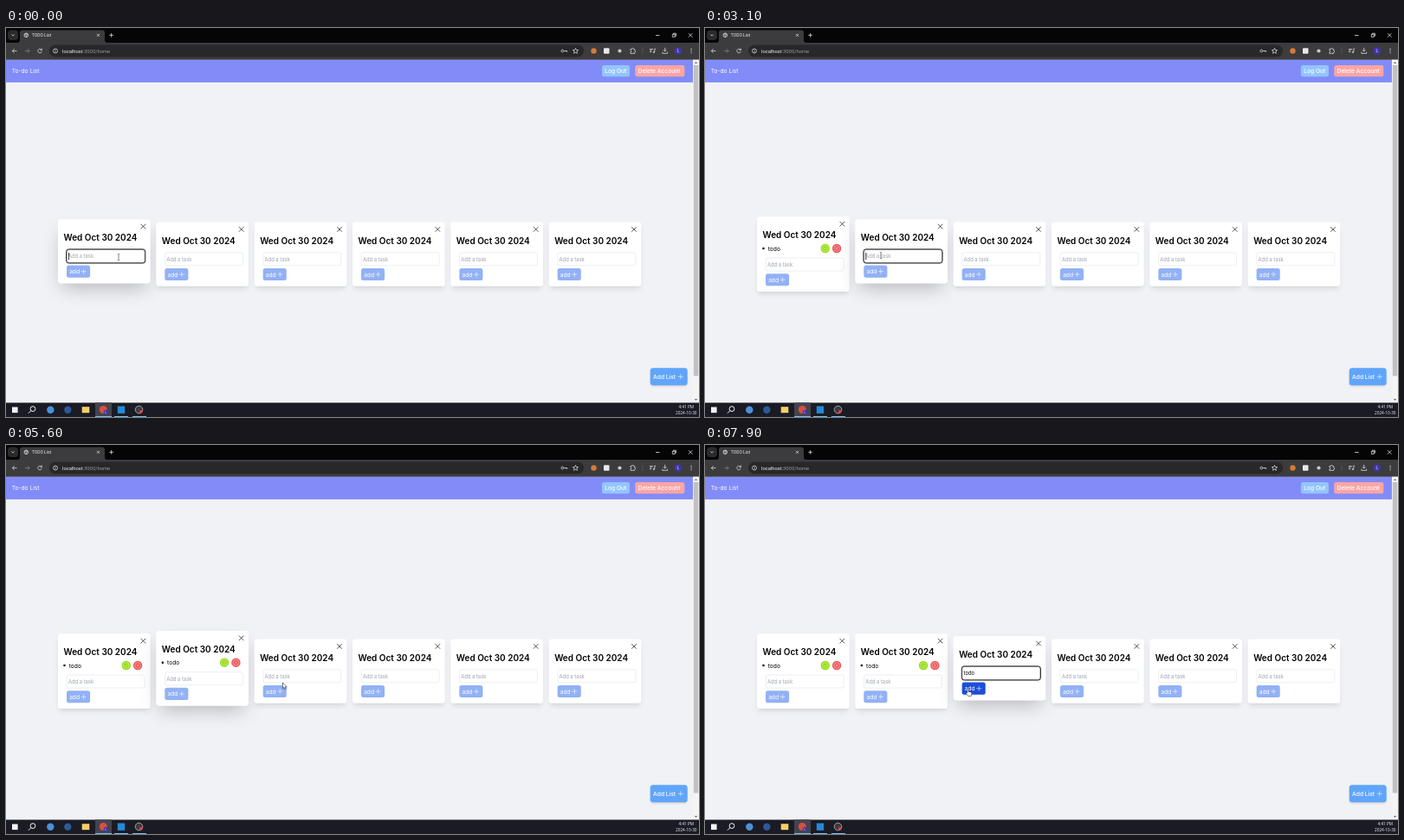
Animation, 800 px wide and 450 px high, one loop 8 s. Source, as an HTML page:

```html
<!DOCTYPE html>
<html lang="en">
<head>
<meta charset="utf-8">
<title>TODO List</title>
<style>
html, body { margin: 0; width: 100%; height: 100%; overflow: hidden; background: #f0f2f6; }
/* The desktop is laid out at 1920 x 1080 and shown on an 800 x 450 stage. */
#desktop {
  position: absolute; left: 0; top: 0; width: 1920px; height: 1080px; overflow: hidden;
  transform: scale(.4166667); transform-origin: 0 0;
  font: 16px/24px Inter, sans-serif; color: #000; background: #f0f2f6;
}
#desktop * { box-sizing: border-box; }
#desktop div, #desktop > svg { position: absolute; white-space: pre; }
#frame, #pointer { left: 0; top: 0; width: 1920px; height: 1080px; }
.icon { fill: none; stroke: currentColor; stroke-width: 1.6; stroke-linecap: round; stroke-linejoin: round; }

#nav { left: 0; top: 88px; width: 1903px; height: 63px; background: #818cf8; color: #fff; }
#nav div { top: 15px; height: 32px; line-height: 32px; padding: 0 8px; border-radius: 6px; font-weight: 500; }
#nav .brand { left: 8px; font-weight: 400; }
#nav .logout { left: 1651px; width: 77px; background: #93c5fd; }
#nav .delete { left: 1743px; width: 137px; background: #fca5a5; }
#new {
  left: 1785px; top: 944px; width: 103px; height: 48px; padding-left: 8px; line-height: 48px;
  border-radius: 8px; background: #60a5fa; color: #fff; font-weight: 500;
  box-shadow: 0 4px 6px -1px #0002, 0 2px 4px -2px #0002;
}
#new svg { position: absolute; right: 9px; top: 14px; }

.card {
  --lift: 0; top: 539px; width: 256px; height: 178px; border-radius: 8px; background: #fff;
  transform: translateY(calc(-8px * var(--lift)));
  box-shadow:
    0 calc(10px + 15px * var(--lift)) calc(15px + 35px * var(--lift)) calc(-3px - 9px * var(--lift))
      rgba(0, 0, 0, calc(.1 + .15 * var(--lift))),
    0 4px 6px -4px rgba(0, 0, 0, calc(.1 - .1 * var(--lift)));
}
.card .close { position: absolute; left: 224px; top: 8px; }
.title { left: 16px; top: 36px; font: 600 24px/32px Inter, sans-serif; }
.item { display: none; left: 0; top: 76px; width: 256px; height: 24px; }
.item span { position: absolute; left: 31px; }
.item svg { position: absolute; left: 0; top: 0; }
.form { left: 0; top: 0; width: 256px; height: 178px; }
.full { top: 524px; height: 208px; }
.full .item { display: block; }
.full .form { top: 30px; }
.field {
  left: 24px; top: 84px; width: 217px; height: 37px; padding-left: 4px; line-height: 35px;
  border: 1px solid #d1d5db; border-radius: 6px; font-size: 14px; background: #fff;
}
.field.empty { color: #9ca3af; }
.field.focus { border-color: #111; outline: 2px solid #111; }
.caret { display: inline-block; width: 2px; height: 19px; margin-right: -2px; vertical-align: -4px; background: #000; }
.add {
  left: 24px; top: 128px; width: 65px; height: 34px; padding-left: 8px; line-height: 34px;
  border-radius: 6px; color: #fff; background: #92b1f5;
}
.add svg { position: absolute; left: 37px; top: 7px; }
</style>
</head>
<body>
<div id="desktop">
  <div id="nav"><div class="brand">To-do List</div><div class="logout">Log Out</div><div class="delete">Delete Account</div></div>
  <div id="new">Add List</div>

  <svg id="frame" viewBox="0 0 800 450" font-family="Roboto, sans-serif" font-size="5.1">
    <!-- tab strip -->
    <path fill="#050506" d="M0 0H800V17H0z"/>
    <rect x="2" y="2.5" width="12" height="11.5" rx="4" fill="#2b2b2d"/>
    <path fill="#3c3c3e" d="M13 17q3 0 3-3V5.500q0-3 3-3H111q3 0 3 3V14q0 3 3 3z"/>
    <text x="29.800" y="10.400" fill="#eee" font-size="5">TODO List</text>
    <g fill="none" stroke="#e4e4e6" stroke-width=".8">
      <path d="M6.500 7.500l1.600 1.600l1.600-1.600M105 6.800l3 3m0-3l-3 3M119.300 8.300h4.600m-2.300-2.300v4.600"/>
      <path d="M750 8.500h4.500M769.300 7.300h3v3h-3zM770.400 7.300v-1.100h3v3h-1.100M788 6.200l4.400 4.400m0-4.400l-4.400 4.400"/>
      <circle cx="23.300" cy="8.300" r="2.300"/><path d="M21.300 7.300l2 1l.3 2M23.300 6l.5 1.500l1.600.4" stroke-width=".7"/>
    </g>

    <!-- toolbar -->
    <path fill="#3c3c3e" d="M0 17H800V36.700H0z"/>
    <rect x="50" y="19.500" width="617" height="14" rx="7" fill="#28282a"/>
    <g fill="none" stroke="#d6d6d8" stroke-width=".8">
      <path d="M12.500 26.500H7.300m2.400-2.400l-2.400 2.400l2.400 2.400M41.100 25.300a2.300 2.300 0 1 0 .2 1.900M41.400 23.600v2h-2"/>
      <path stroke="#818184" d="M22 26.500h5.200m-2.400-2.400l2.400 2.400l-2.400 2.400"/>
      <circle cx="57" cy="26.500" r="2.500"/><path d="M57 26.200v1.600m0-3v.7"/>
      <circle cx="642.300" cy="26.500" r="1.400"/><path d="M643.700 26.500h4v1.400m-1.500-1.400v1"/>
      <path d="M657.500 23.400l.9 2l2.200.2l-1.700 1.500l.5 2.200l-1.900-1.100l-1.900 1.100l.5-2.200l-1.700-1.500l2.200-.2z"/>
      <path d="M720.900 24.400h1.500a1 1 0 0 1 2 0h1.300v1.700a1 1 0 0 1 0 2v1.300h-4.800v-1.500a1 1 0 0 0 0-2z"/>
      <path d="M743 24.500h4.200m-4.200 1.600h2.800m-2.800 1.600h2M748.800 24v3.800m0-3.700h1.300"/><circle cx="747.900" cy="28" r=".8"/>
      <path d="M760.700 22.800v4.200m-1.800-1.700l1.800 1.800l1.800-1.800M757.800 27.700v1.700h5.800v-1.700"/>
      <path stroke="#5a5a5d" d="M735 23v7"/>
    </g>
    <text x="65" y="28.500" fill="#9b9ba0" font-size="5.800"><tspan fill="#f0f0f2">localhost</tspan>:3000/home</text>
    <circle cx="678.500" cy="26.500" r="3.200" fill="#d97a35"/>
    <rect x="690" y="23.200" width="6.500" height="6.500" rx="1" fill="#e8e8ea"/>
    <circle cx="708.500" cy="26.500" r="2.100" fill="#c9c9cc"/>
    <circle cx="775.800" cy="26.500" r="4" fill="#4335b5"/>
    <text x="775.800" y="28.300" fill="#ddd" text-anchor="middle">L</text>
    <path stroke="#e4e4e6" stroke-width="1.100" stroke-dasharray="1.100 1.100" d="M791 23.800v5.500"/>

    <!-- scrollbar -->
    <path fill="#f4f4f5" d="M793 36.700H800V433.400H793z"/>
    <path fill="#c1c1c3" d="M793.800 43H799.300V402.500H793.800z"/>
    <path fill="#77777a" d="M794.700 41l1.800-2l1.800 2zM794.700 429l1.800 2l1.800-2z"/>

    <!-- taskbar -->
    <path fill="#1a1b24" d="M0 433.400H800V450H0z"/>
    <path fill="#43444e" d="M103 433.400h19V450h-19z"/>
    <path fill="#7dbdf0" d="M103 449h19v1h-19zM125 449h16v1h-16zM146 449h16v1h-16z"/>
    <rect x="7" y="438.500" width="6.600" height="6.600" fill="#f4f4f6"/>
    <g fill="none" stroke="#f0f0f2" stroke-width="1"><circle cx="31" cy="440.600" r="2.900"/><path d="M28.900 442.700l-3 3"/></g>
    <circle cx="51.300" cy="441.700" r="4.200" fill="#4c91d8"/>
    <circle cx="71.300" cy="441.700" r="4.200" fill="#2b5a96"/>
    <rect x="87.700" y="438.200" width="8.600" height="7" fill="#f3cf68"/>
    <circle cx="112.300" cy="441.500" r="4.500" fill="#d9503f"/>
    <circle cx="115.300" cy="444.300" r="2.600" fill="#4335b5"/>
    <text x="115.300" y="445.500" fill="#ddd" font-size="3.500" text-anchor="middle">L</text>
    <rect x="128.800" y="437.500" width="8.400" height="8.400" fill="#2489d6"/>
    <circle cx="153.500" cy="441.500" r="4.300" fill="#3a3a40" stroke="#cfcfd2" stroke-width=".7"/>
    <circle cx="155.800" cy="443.800" r="1.900" fill="#e0443e"/>
    <g fill="#f2f2f4" font-family="Open Sans, sans-serif" font-size="4.700" text-anchor="middle">
      <text x="785.300" y="439.500">4:41 PM</text><text x="785.300" y="447">2024-10-30</text>
    </g>
  </svg>

  <svg id="pointer" viewBox="0 0 800 450">
    <path id="arrow" fill="#fff" stroke="#222" stroke-width=".6" d="M0 0V6.700L1.600 5.300L2.700 7.800L3.800 7.300L2.700 4.900H4.800z"/>
    <path id="text" fill="none" stroke="#333" stroke-width=".6" d="M-1.200-3.500h.7l.5.400l.5-.4h.7M0-3.100V3.100M-1.200 3.500h.7l.5-.4l.5.400h.7"/>
    <path id="hand" fill="#fff" stroke="#222" stroke-width=".6" stroke-linejoin="round"
      d="M-.7.500q.7-1 1.400 0V3.200l3 .8q.8.300.7 1.200L3.900 8.400H.1L-2.300 5.300q0-1 .9-.8l.7.500z"/>
  </svg>
</div>

<script>
const LOOP = 8000, STEP = 100;
const $ = id => document.getElementById(id);
const icon = (size, d, cls = '') =>
  `<svg class="icon ${cls}" width="${size}" height="${size}" viewBox="0 0 24 24"><path d="${d}"/></svg>`;
const plus = icon(20, 'M12 4.5v15M4.5 12h15');

const badge = (x, fill, mark) => `<circle cx="${x}" cy="12" r="12.500" fill="${fill}"/>
  <g fill="none" stroke="#fff" stroke-opacity=".6" stroke-width="1.600"><circle cx="${x}" cy="12" r="8"/><path d="M${x} 12${mark}"/></g>`;
const badges = `<svg width="256" height="26" style="overflow:visible"><circle cx="18" cy="12" r="3"/>
  ${badge(189, '#98de18', 'm-3 0l2.500 2.500l4-5')}${badge(221, '#f0565a', 'm-3-3l6 6m0-6l-6 6')}</svg>`;

const cards = Array.from({ length: 6 }, (_, i) => {
  const card = document.createElement('div');
  card.className = 'card';
  card.style.left = 143.5 + 272 * i + 'px';
  card.innerHTML = icon(24, 'M6 18L18 6M6 6l12 12', 'close') +
    `<div class="title">Wed Oct 30 2024</div><div class="item">${badges}<span>todo</span></div>` +
    `<div class="form"><div class="field empty">Add a task</div><div class="add">add${plus}</div></div>`;
  $('desktop').insertBefore(card, $('frame'));
  return card;
});
$('new').insertAdjacentHTML('beforeend', plus);

// One visit per list: pointer enters, field focused, keys typed, button hovered, field blurred, task added, pointer leaves.
const visits = [
  { enter: -1000, focus: 0, keys: [300, 1000, 1100, 1300], hover: 2300, blur: 2400, add: 2500, leave: 2800 },
  { enter: 2800, focus: 3000, keys: [3600, 3700, 3800, 3900], hover: 4800, blur: 5100, add: 5300, leave: 5600 },
  { enter: 5600, focus: 6000, keys: [6400, 6700, 7000, 7300], hover: 7600, blur: LOOP, add: LOOP, leave: LOOP },
];

// time, x, y
const path = [
  [0, 130, 265], [2000, 130, 265], [2300, 88, 282], [2600, 89, 279], [2800, 166, 270], [3000, 203, 263],
  [4600, 203, 263], [4900, 200, 283], [5200, 210.5, 281], [5500, 262, 279], [5600, 319.5, 275],
  [5900, 336, 266], [7400, 336, 266], [7700, 306, 284], [7900, 303.5, 282], [LOOP, 303.5, 282],
];

const clamp = v => Math.min(1, Math.max(0, v));
const ease = v => { v = clamp(v); return v * v * (3 - 2 * v); };
const mix = (a, b, k) => a + (b - a) * k;

function pointerAt(t) {
  const i = path.findIndex(p => p[0] > t);
  const [t0, x0, y0] = path[i - 1], [t1, x1, y1] = path[i];
  const k = (t - t0) / (t1 - t0);
  return [mix(x0, x1, k), mix(y0, y1, k)];
}

function drawCard(card, v, t) {
  const added = t >= v.add;
  const focused = t >= v.focus && t < v.blur;
  const hovered = t >= v.hover && !added;
  const typed = added ? '' : 'todo'.slice(0, v.keys.filter(k => t >= k).length);
  const lastEdit = Math.max(v.focus, ...v.keys.filter(k => t >= k));
  const caret = focused && (t - lastEdit + 600) % 1000 >= 500 ? '<i class="caret"></i>' : '';

  card.style.setProperty('--lift', ease((t - v.enter) / 200) - ease((t - v.leave) / 200));
  card.classList.toggle('full', added);
  const field = card.querySelector('.field');
  field.className = 'field' + (typed ? '' : ' empty') + (focused ? ' focus' : '');
  field.innerHTML = typed ? typed + caret : caret + 'Add a task';

  const on = added ? 0 : clamp((t - v.keys[0] + 50) / 200);
  const from = [146, 177, 245], to = hovered ? [29, 78, 216] : [37, 99, 235];
  card.querySelector('.add').style.background = `rgb(${from.map((c, j) => mix(c, to[j], on))})`;
}

function drawPointer(t) {
  const [x, y] = pointerAt(t);
  const i = visits.findIndex(v => t < v.leave), v = visits[i];
  const dx = x - 59.8 - i * 113.333;
  const onButton = t >= v.hover && t < v.add && dx < 37;
  const onField = dx > 10 && dx < 100.5 && y > 255 && y < 272;
  const kind = onButton ? 'hand' : onField ? 'text' : 'arrow';
  for (const id of ['arrow', 'text', 'hand']) {
    $(id).style.display = id === kind ? '' : 'none';
    $(id).setAttribute('transform', `translate(${x} ${y})`);
  }
}

const start = performance.now();
function draw() {
  const t = Math.floor((performance.now() - start) % LOOP / STEP) * STEP;
  visits.forEach((v, i) => drawCard(cards[i], v, t));
  drawPointer(t);
  requestAnimationFrame(draw);
}
draw();
</script>
</body>
</html>
```
